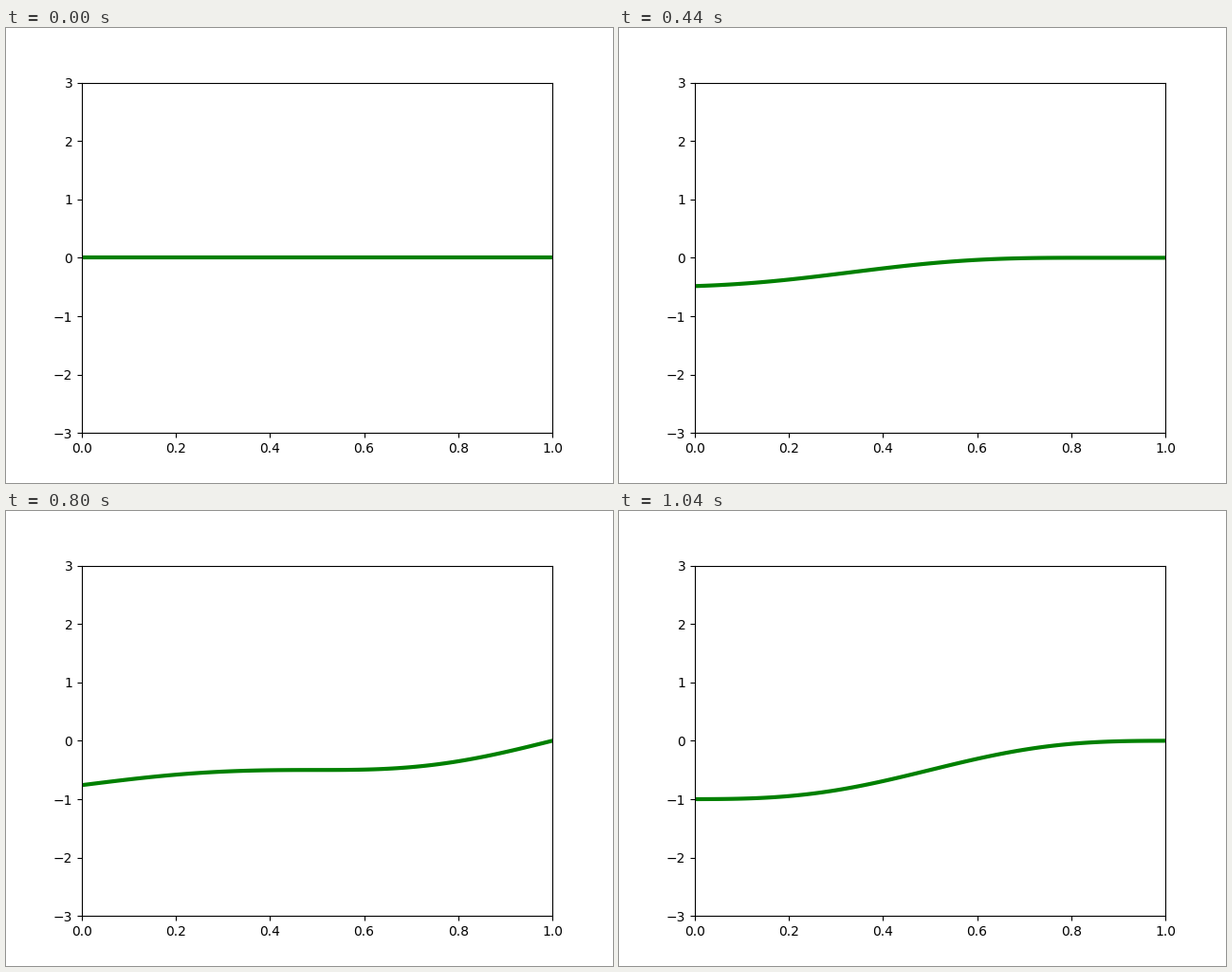
Write a matplotlib script that moves like this. It is 640x480 px and loops after 1060 ms.

```python
import numpy as np
import matplotlib.pyplot as plt
from matplotlib.animation import FuncAnimation

FRAMES = 53
INTERVAL = 20  # ms
DURATION = 2.0  # time for the wave to reach the wall and return

x = np.linspace(0, 1, 101)


def pulse(s):
    """Integral of sin^2(pi s), zero before the wave arrives."""
    s = np.maximum(s, 0)
    return s / 2 - np.sin(2 * np.pi * s) / (4 * np.pi)


def wave(t):
    """Wave driven at x = 0 and reflected by the fixed end x = 1."""
    return pulse(t - 2 + x) - pulse(t - x)


fig, ax = plt.subplots(figsize=(6.4, 4.8), dpi=100)
ax.set_xlim(0, 1)
ax.set_ylim(-3, 3)
line, = ax.plot(x, wave(0), color="green", lw=3)


def update(i):
    line.set_ydata(wave(DURATION * i / FRAMES))
    return line,


anim = FuncAnimation(fig, update, frames=FRAMES, interval=INTERVAL,
                     repeat=True, repeat_delay=0)
plt.show()
```
